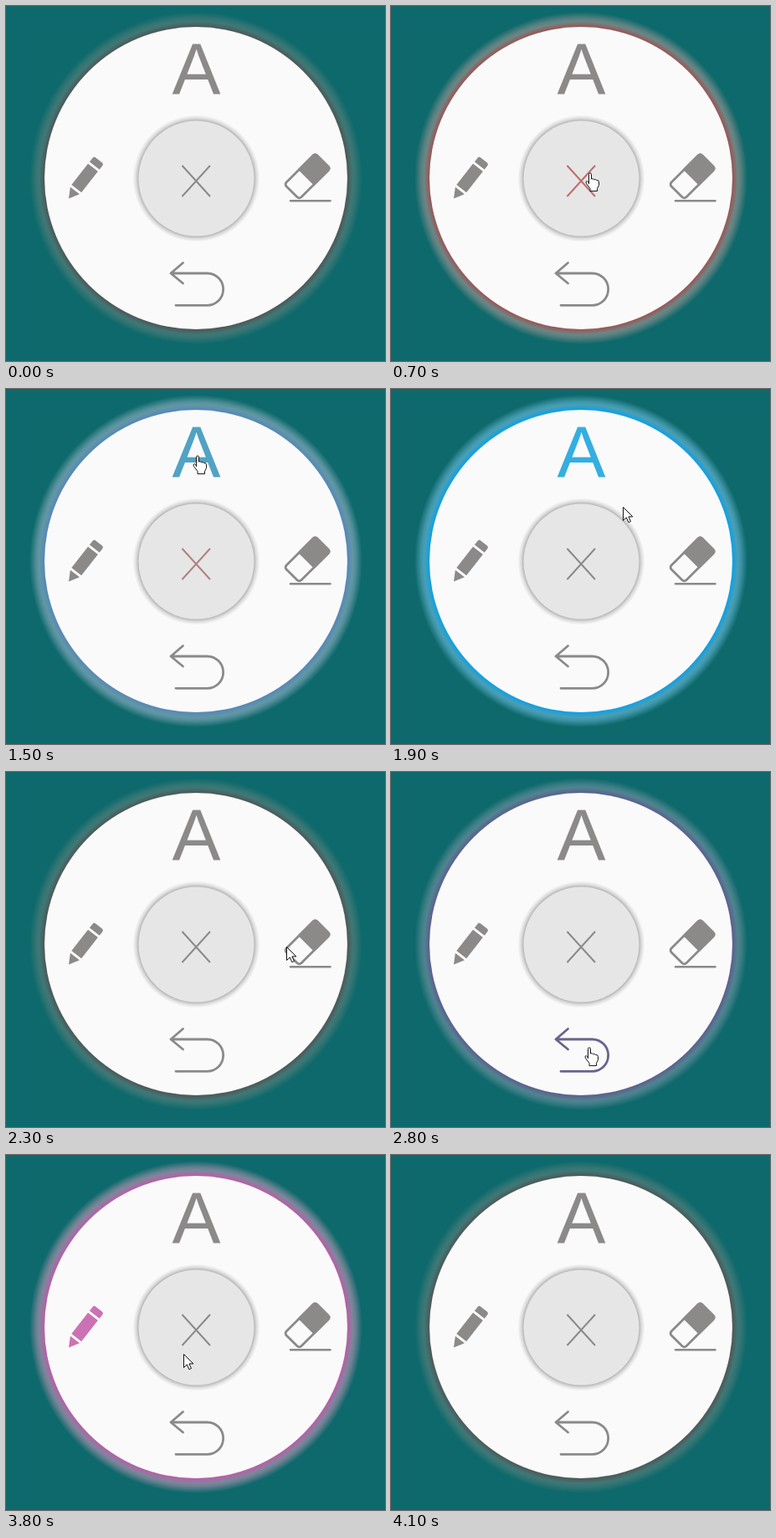
Animation of 453 by 425 pixels, one loop 4.5 s. Source, as an HTML page without scripts:

```html
<!DOCTYPE html>
<html lang="en">
<head>
<meta charset="utf-8">
<title>Radial tool menu</title>
<style>
html, body { margin: 0; width: 100%; height: 100%; overflow: hidden; background: #0d696b; }
svg { display: block; width: 453px; height: 425px; }

/* Everything advances in 100 ms ticks on one 4.5 s loop */
.edge, .halo, .tool, .move, .hand, .arrow { animation: 4.5s step-end infinite; }
.edge { animation-name: edge; }
.halo { animation-name: halo; }
.tool { color: #8c8989; fill: none; stroke: currentColor; }
.solid { fill: currentColor; stroke: none; }
.close { animation-name: close; }
.text { animation-name: text; font: 87px "Liberation Sans", Arial, sans-serif; text-anchor: middle; }
.undo { animation-name: undo; }
.pencil { animation-name: pencil; }
.move { animation-name: move; }
.hand { animation-name: hand; }
.arrow { animation-name: arrow; }
.move path { fill: #fff; stroke: #111; stroke-linejoin: round; }

@keyframes edge {
  0%, 13.33% { stop-color: #4c5b5a; }
  15.55% { stop-color: #965a5a; animation-timing-function: steps(2); }
  20% { stop-color: #de5c5e; }
  28.88% { stop-color: #de5c5e; animation-timing-function: steps(3); }
  35.55% { stop-color: #14a0e1; }
  42.22% { stop-color: #14a0e1; animation-timing-function: steps(4); }
  51.11% { stop-color: #4c5b5a; }
  55.55% { stop-color: #4c5b5a; animation-timing-function: steps(3); }
  62.22% { stop-color: #5c628e; }
  64.44% { stop-color: #5f5c9c; }
  66.66% { stop-color: #5f5c9c; animation-timing-function: steps(4); }
  75.55% { stop-color: #cb64b9; }
  77.77% { stop-color: #d664c0; }
  82.22% { stop-color: #d664c0; animation-timing-function: steps(4); }
  91.11%, 100% { stop-color: #4c5b5a; }
}
@keyframes halo {
  0%, 13.33% { stop-color: #3f7876; }
  15.55% { stop-color: #6c8685; animation-timing-function: steps(2); }
  20% { stop-color: #938885; }
  28.88% { stop-color: #938885; animation-timing-function: steps(3); }
  35.55% { stop-color: #4a9fb5; }
  42.22% { stop-color: #4a9fb5; animation-timing-function: steps(4); }
  51.11% { stop-color: #3f7876; }
  55.55% { stop-color: #3f7876; animation-timing-function: steps(3); }
  62.22% { stop-color: #4f8490; }
  64.44% { stop-color: #558696; }
  66.66% { stop-color: #558696; animation-timing-function: steps(4); }
  75.55% { stop-color: #8c8ba4; }
  77.77% { stop-color: #948ba8; }
  82.22% { stop-color: #948ba8; animation-timing-function: steps(4); }
  91.11%, 100% { stop-color: #3f7876; }
}
@keyframes close {
  0%, 13.33% { color: #8c8989; }
  15.55% { color: #c06c6c; animation-timing-function: steps(2); }
  20% { color: #f07676; }
  28.88% { color: #f07676; animation-timing-function: steps(3); }
  35.55%, 100% { color: #8c8989; }
}
@keyframes text {
  0% { color: #8c8989; }
  28.88% { color: #8c8989; animation-timing-function: steps(3); }
  35.55% { color: #34aee0; }
  42.22% { color: #34aee0; animation-timing-function: steps(4); }
  51.11%, 100% { color: #8c8989; }
}
@keyframes undo {
  0% { color: #8c8989; }
  55.55% { color: #8c8989; animation-timing-function: steps(3); }
  62.22% { color: #6c628c; }
  64.44% { color: #5f528e; }
  66.66% { color: #5f528e; animation-timing-function: steps(3); }
  73.33%, 100% { color: #8c8989; }
}
@keyframes pencil {
  0% { color: #8c8989; }
  68.88% { color: #8c8989; animation-timing-function: steps(3); }
  75.55% { color: #dc6ebe; }
  77.77% { color: #e06ac4; }
  82.22% { color: #e06ac4; animation-timing-function: steps(4); }
  91.11%, 100% { color: #8c8989; }
}

/* Pointer path */
@keyframes move {
  0% { transform: translate(500px, 217px); }
  2.22% { transform: translate(377px, 217px); }
  4.44% { transform: translate(364px, 206px); }
  6.66% { transform: translate(350px, 192px); }
  8.88% { transform: translate(328px, 176px); }
  11.11% { transform: translate(290px, 183px); }
  13.33% { transform: translate(255px, 194px); }
  15.55% { transform: translate(238px, 200px); }
  28.88% { transform: translate(232px, 119px); }
  31.11% { transform: translate(229px, 88px); }
  33.33% { transform: translate(229px, 80px); }
  40% { transform: translate(245px, 108px); }
  42.22% { transform: translate(277px, 141px); }
  44.44% { transform: translate(302px, 168px); }
  46.66% { transform: translate(320px, 190px); }
  48.88% { transform: translate(331px, 204px); }
  51.11% { transform: translate(335px, 209px); }
  57.77% { transform: translate(256px, 312px); }
  60% { transform: translate(241px, 327px); }
  62.22% { transform: translate(237px, 330px); }
  68.88% { transform: translate(190px, 284px); }
  71.11% { transform: translate(134px, 230px); }
  73.33% { transform: translate(107px, 208px); }
  75.55% { transform: translate(102px, 203px); }
  82.22% { transform: translate(132px, 216px); }
  84.44% { transform: translate(212px, 238px); }
  86.66% { transform: translate(322px, 256px); }
  88.88% { transform: translate(440px, 268px); }
  91.11%, 100% { transform: translate(500px, 268px); }
}
@keyframes hand {
  0%, 15.55%, 31.11%, 53.33%, 73.33% { opacity: 1; }
  11.11%, 28.88%, 40%, 68.88%, 82.22%, 100% { opacity: 0; }
  57.77% { opacity: 1; }
}
@keyframes arrow {
  0%, 15.55%, 31.11%, 53.33%, 73.33% { opacity: 0; }
  11.11%, 28.88%, 40%, 68.88%, 82.22%, 100% { opacity: 1; }
  57.77% { opacity: 0; }
}
</style>
</head>
<body>
<svg viewBox="0 0 453 425">
  <defs>
    <radialGradient id="glow" gradientUnits="userSpaceOnUse" cx="227" cy="206" r="199">
      <stop class="edge" offset=".914"/>
      <stop class="halo" offset=".942"/>
      <stop class="halo" offset=".96" stop-opacity=".8"/>
      <stop class="halo" offset="1" stop-opacity="0"/>
    </radialGradient>
    <radialGradient id="rim" gradientUnits="userSpaceOnUse" cx="227.5" cy="206.5" r="76">
      <stop offset=".91" stop-color="#b9b7b7"/>
      <stop offset=".95" stop-color="#dedede"/>
      <stop offset="1" stop-color="#fafafa"/>
    </radialGradient>
  </defs>

  <circle cx="227" cy="206" r="199" fill="url(#glow)"/>
  <circle cx="227" cy="206" r="181" fill="#fafafa"/>
  <circle cx="227.5" cy="206.5" r="76" fill="url(#rim)"/>
  <circle cx="227.5" cy="206.5" r="69" fill="#e6e6e6"/>

  <text class="tool solid text" x="227.5" y="106">A</text>

  <path class="tool close" d="M210.5 191l33.5 37m0-37l-33.5 37" stroke-width="2"/>

  <g class="tool solid pencil" transform="translate(75 230.500) rotate(-52)">
    <path d="M0 0L12-7V7z"/>
    <path d="M15-7.500H47V7.500H15z"/>
    <path d="M50-7.500h5.500q3 0 3 3v9q0 3-3 3H50z"/>
  </g>

  <g class="tool" stroke-width="2.800">
    <g transform="translate(360 204) rotate(-45)">
      <rect x="-26" y="-12.600" width="52" height="25.200" rx="3.500"/>
      <path class="solid" d="M-2-14H23q4.500 0 4.500 4.500v19q0 4.500-4.500 4.500H-2z"/>
    </g>
    <path d="M340 233.300H387.500" stroke-linecap="round" stroke-width="2.400"/>
  </g>

  <path class="tool undo" d="M211.500 307.500L197 320l14.500 12M197 320h43.500a19 19 0 0 1 0 38.300H203"
        stroke-width="2.800" stroke-linecap="round" stroke-linejoin="round"/>

  <g class="move">
    <path class="hand" d="M-1.500 13V1.500a1.500 1.500 0 0 1 3 0V7q2-.8 3 .8 2-.8 3 .8 2.800-.6 3 2v4l-2 4v3H0v-3l-4.500-6q-1.500-2.500 .8-3 1 .2 2.200 2.500z"/>
    <path class="arrow" d="M.5 .5V16.500l3.800-3.600 2.600 5.800 2.600-1.200-2.600-5.600h5z"/>
  </g>
</svg>
</body>
</html>
```
